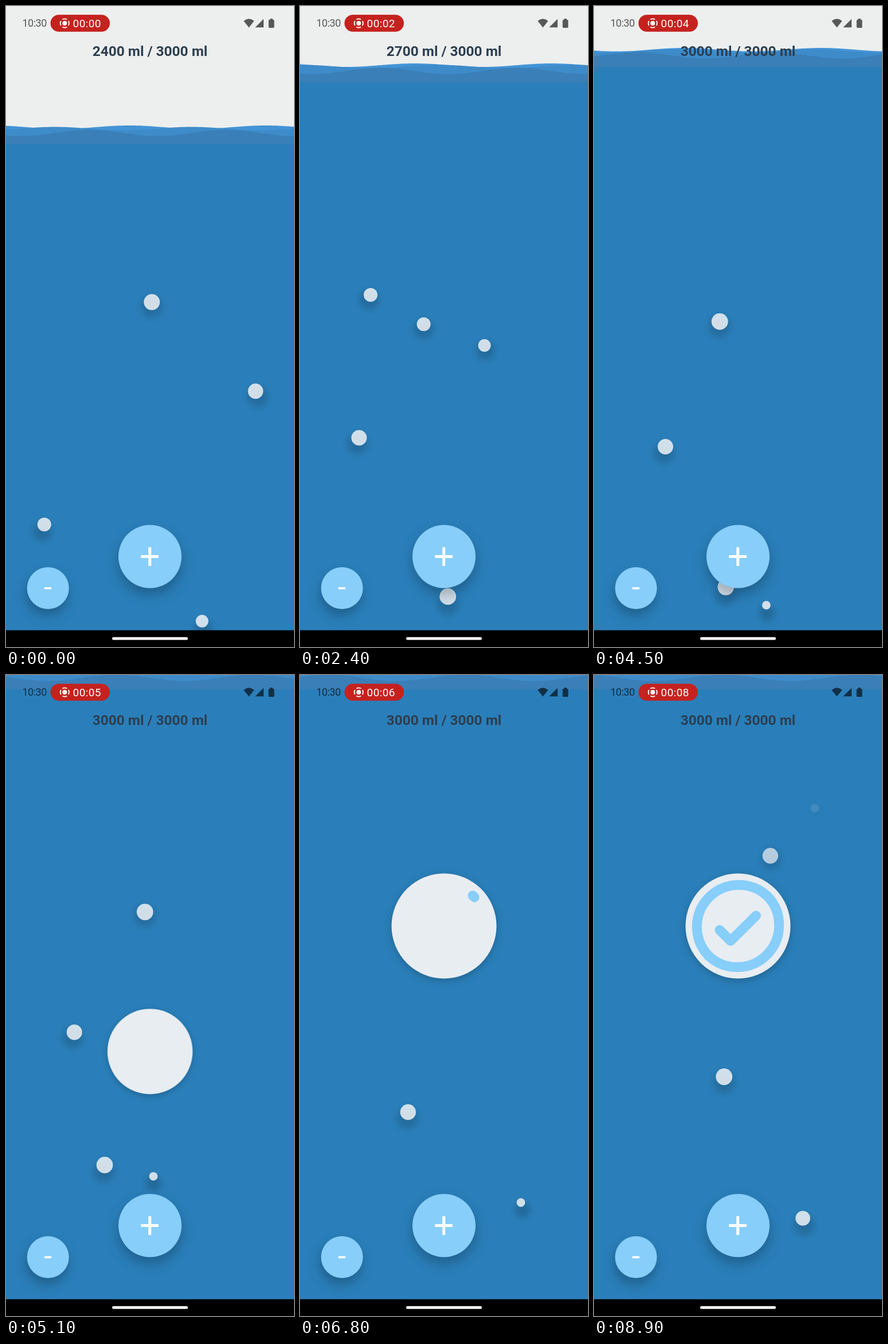
These frames come from a looping animation (502 by 1116 pixels, 9 s). An HTML page with a canvas:

```html
<!DOCTYPE html>
<html lang="en">
<head>
<meta charset="utf-8">
<title>Water tracker</title>
<style>
  html, body { margin: 0; width: 100%; height: 100%; overflow: hidden; background: #edefee; }
  canvas, svg { position: absolute; left: 0; top: 0; width: 502px; height: 1116px; display: block; }
  text { font-family: Roboto, sans-serif; }
  .title { font-size: 24.4px; font-weight: 700; fill: #2c3e50; text-anchor: middle; }
  .status { fill: rgba(0, 0, 0, .63); }
  .time { font-size: 18px; letter-spacing: -.5px; }
  .timer { font-size: 19px; letter-spacing: .4px; fill: #fff; }

  .plus { filter: drop-shadow(0 11px 11px rgba(0, 0, 0, .25)); }
  .minus { filter: drop-shadow(-2px 11px 10px rgba(0, 0, 0, .25)); }
  .disc { filter: drop-shadow(0 4px 7px rgba(0, 0, 0, .22)); }

  .badge { animation: rise 9s infinite; }
  .mark { fill: none; stroke: #87cefa; stroke-width: 17; stroke-linecap: round; stroke-linejoin: round; stroke-dasharray: 1 2; }
  .ring { animation: ring 9s infinite; }
  .check { animation: check 9s infinite; }

  @keyframes rise {
    0%, 51.88% { transform: translate(251px, 958px) scale(.55); visibility: hidden; }
    51.89% { transform: translate(251px, 958px) scale(.55); visibility: visible; animation-timing-function: cubic-bezier(.33, 1, .68, 1); }
    70.89%, 100% { transform: translate(251px, 437px); visibility: visible; }
  }
  @keyframes ring {
    0%, 74.56% { stroke-dashoffset: 1; visibility: hidden; }
    74.57% { stroke-dashoffset: 1; visibility: visible; animation-timing-function: cubic-bezier(.45, 0, .55, 1); }
    87.9%, 100% { stroke-dashoffset: 0; visibility: visible; }
  }
  @keyframes check {
    0%, 87.99% { stroke-dashoffset: 1; visibility: hidden; }
    88% { stroke-dashoffset: 1; visibility: visible; animation-timing-function: ease-in-out; }
    93%, 100% { stroke-dashoffset: 0; visibility: visible; }
  }
</style>
</head>
<body>
<canvas width="502" height="1116"></canvas>
<svg viewBox="0 0 502 1116">
  <g class="status">
    <text class="time" x="28.5" y="36.3">10:30</text>
    <path d="M414.3 26Q423.4 18.6 432.5 26L423.4 37.6Z"/>
    <path d="M449 22.5V37.3H434.3Z"/>
    <path d="M460.3 22h4.6v2h1.2q1.4 0 1.4 1.4v11.2q0 1.4-1.4 1.4h-7q-1.4 0-1.4-1.4v-11.2q0-1.4 1.4-1.4h1.2z"/>
  </g>
  <rect x="77.5" y="15.3" width="103.5" height="29.5" rx="14.75" fill="#c5221f"/>
  <circle cx="102.3" cy="30" r="4" fill="#fff"/>
  <circle cx="102.3" cy="30" r="7.6" fill="none" stroke="#fff" stroke-width="1.8" pathLength="8" stroke-dasharray="1.4 .6" stroke-dashoffset=".7"/>
  <text class="timer" x="116.6" y="36.6" id="timer">00:00</text>
  <text class="title" x="251" y="87" id="title">2400 ml / 3000 ml</text>

  <g class="badge">
    <circle class="disc" r="91.5" fill="#e8edf2"/>
    <path class="mark ring" pathLength="1" d="M51.6-51.6A73 73 0 0 1-51.6 51.6"/>
    <path class="mark ring" pathLength="1" d="M51.6-51.6A73 73 0 0 0-51.6 51.6"/>
    <path class="mark check" pathLength="1" d="M-32 7L-13 26L31.5-18"/>
  </g>

  <circle class="plus" cx="251" cy="958.5" r="55" fill="#87cefa"/>
  <path d="M235.3 958.4H266M250.7 942.3V975" stroke="#fff" stroke-width="5"/>
  <circle class="minus" cx="73.2" cy="1013.5" r="36.5" fill="#87cefa"/>
  <path d="M66.8 1013.7H79.2" stroke="#fff" stroke-width="3.6"/>

  <rect y="1086.8" width="502" height="30"/>
  <rect x="185" y="1098.8" width="132" height="5" rx="2.5" fill="#f4f4f4"/>
</svg>
<script>
const LOOP = 9000, W = 502, H = 1116, FLOOR = 1100, LIFE = 3900, TAU = 2 * Math.PI;
const ctx = document.querySelector('canvas').getContext('2d');
const title = document.getElementById('title');
const timer = document.getElementById('timer');

// Taps on the plus button; each adds 300 ml and one bubble.
const taps = [300, 4300];

// Back to front; `up` is the height above the water body.
const waves = [
  { fill: '#4394d6', up: 30, amp: 3, crest: 215, speed: .093 },
  { fill: '#3e8bca', up: 27.5, amp: 3, crest: 85, speed: .0655 },
  { fill: '#3a7fb7', up: 20, amp: 5.5, crest: 145, speed: .196 },
];

const bubble = (x, r, speed, swing = 25) => ({ x, r, speed, swing });

// Bubbles leave the floor at a steady beat, forwards or backwards from a first one.
const emit = (first, beat, list) => list.map((b, i) => ({ ...b, born: first + beat * i }));

const bubbles = [
  ...emit(-145, -1040, [
    bubble(331, 11, .2, 11),
    bubble(82, 12, .1665, -105),
    bubble(460, 13.3, .193),
    bubble(266, 14, .179),
  ]),
  ...emit(taps[0], taps[1] - taps[0], [
    bubble(233, 12, .26),
    bubble(260, 7.4, .284, 44),
  ]),
  ...emit(1045, 1040, [
    bubble(107, 13.5, .257, 5),
    bubble(236, 14.4, .228),
    bubble(143, 13.5, .242),
    bubble(184, 14.3, .264, 57),
    bubble(246, 13.7, .2125, 75),
    bubble(385, 7.4, .327, 0),
    bubble(251, 14.4, .248),
    bubble(353, 12.8, .268),
  ]),
];

const clamp = v => Math.min(1, Math.max(0, v));
const smooth = v => (1 - Math.cos(Math.PI * clamp(v))) / 2;

function drawWater(t) {
  const top = taps.reduce((y, tap) => y - 108 * smooth((t - tap) / 600), 241);
  for (const { fill, up, amp, crest, speed } of waves) {
    ctx.fillStyle = fill;
    ctx.beginPath();
    ctx.moveTo(0, top + 1);
    for (let x = 0; x <= W; x += 2) {
      ctx.lineTo(x, top - up - amp * Math.cos(TAU * (x - crest - speed * t) / 238));
    }
    ctx.lineTo(W, top + 1);
    ctx.fill();
  }
  ctx.fillStyle = '#2a7fba';
  ctx.fillRect(0, top, W, H - top);
}

// The light sits at the top centre, so shadows fall away from it.
function drawShadow(x, y, r) {
  const sx = x + (x - W / 2) * .02, sy = y + 3 + y * .01, sr = r + 16;
  const shade = ctx.createRadialGradient(sx, sy, 0, sx, sy, sr);
  shade.addColorStop(0, 'rgba(0,0,0,.18)');
  shade.addColorStop(.4, 'rgba(0,0,0,.13)');
  shade.addColorStop(.75, 'rgba(0,0,0,.03)');
  shade.addColorStop(1, 'rgba(0,0,0,0)');
  ctx.fillStyle = shade;
  ctx.fillRect(sx - sr, sy - sr, 2 * sr, 2 * sr);
}

function drawBubble({ x, r, speed, swing, born }, t) {
  const age = t - born, climb = speed * age, y = FLOOR - climb;
  const alpha = clamp((y - 215) / 120) * clamp((LIFE - age) / 200);
  if (age < 0 || !alpha) return;
  const cx = x + swing * Math.cos(TAU * climb / 870);
  ctx.globalAlpha = alpha;
  drawShadow(cx, y, r);
  ctx.fillStyle = 'rgba(238,241,244,.86)';
  ctx.beginPath();
  ctx.arc(cx, y, r, 0, TAU);
  ctx.fill();
  ctx.globalAlpha = 1;
}

let start;
function frame(now) {
  start ??= now;
  const t = (now - start) % LOOP;
  ctx.clearRect(0, 0, W, H);
  drawWater(t);
  bubbles.forEach(b => drawBubble(b, t));
  title.textContent = `${2400 + 300 * taps.filter(tap => t >= tap).length} ml / 3000 ml`;
  timer.textContent = `00:0${Math.floor(t / 1000)}`;
  requestAnimationFrame(frame);
}
requestAnimationFrame(frame);
</script>
</body>
</html>
```
